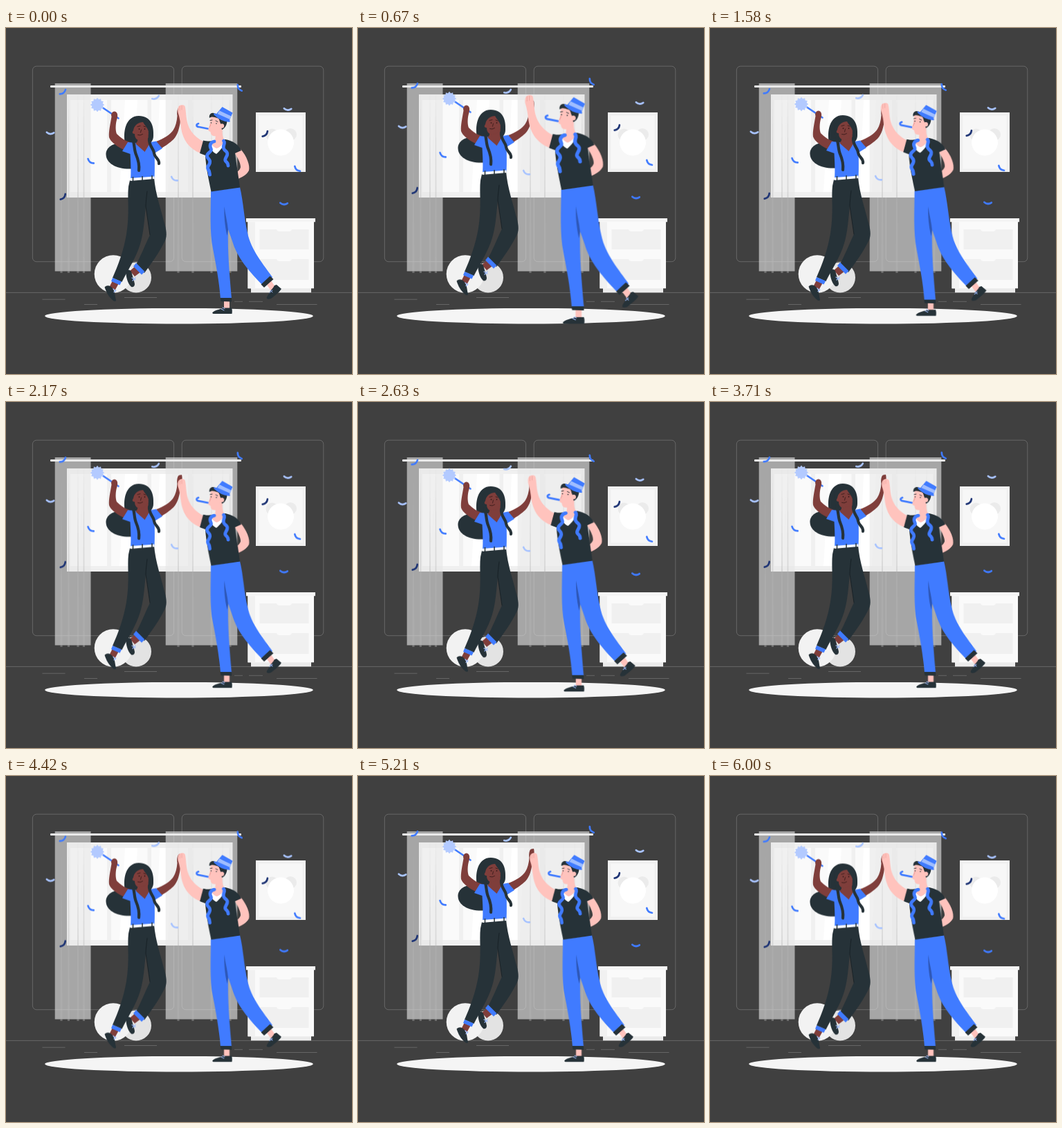
Write an HTML page that moves like this. It is 500 px wide and 500 px high and loops after 6.04 s.

```html
<!DOCTYPE html>
<html lang="en">
<head>
<meta charset="utf-8">
<title>High five</title>
<style>
  html, body { margin: 0; width: 100%; height: 100%; overflow: hidden; background: #404040; }
  svg { display: block; width: 100%; height: 100%; }
  #man { transform-origin: 322px 262.5px; }
  .dark { fill: #263238; }
  .blue { fill: #407bff; }
  .brown { fill: #7f3e3b; }
  .skin { fill: #ffc3bd; }
  .line { fill: none; stroke-linecap: round; stroke-linejoin: round; }
</style>
</head>
<body>
<svg viewBox="0 0 500 500">
  <g id="room">
    <g fill="none" stroke="#777" stroke-width=".7">
      <rect x="38.4" y="55.2" width="204.2" height="282.5" rx="5.7"/>
      <rect x="254.2" y="55.2" width="204.6" height="282.5" rx="5.7"/>
      <path d="M0 382.4H500M52.5 392.2H85.5M113 399.5H132M171 389.5H218M330 395.3H342M351 395.3H371M391 399.5H449.5"/>
    </g>

    <rect x="88" y="96" width="239.5" height="149" fill="#f0f0f0"/>
    <g id="panes" fill="#fafafa"></g>
    <path d="M93 104H112L104 237H93ZM172 104H190L182 237H164ZM222 104H240L234 237H216Z" fill="#fff"/>
    <rect x="64" y="83" width="276" height="3" rx="1" fill="#f0f0f0"/>
    <g fill="#e6e6e6" fill-opacity=".61">
      <rect x="70.7" y="80" width="51.8" height="271.5"/>
      <rect x="230.7" y="80" width="103.6" height="271.5"/>
    </g>
    <g id="folds" fill="#b5b5b5" fill-opacity=".38"></g>

    <rect x="361" y="122" width="72" height="86" fill="#f0f0f0"/>
    <rect x="365.500" y="126.500" width="63" height="77" fill="#f7f7f7"/>
    <circle cx="384.500" cy="154.500" r="9" fill="#ebebeb"/>
    <circle cx="411" cy="154" r="9" fill="#ebebeb"/>
    <circle cx="397" cy="165.500" r="19" fill="#fff"/>

    <rect x="354" y="374" width="87" height="8.300" fill="#ebebeb"/>
    <rect x="349.500" y="279" width="95.500" height="97.300" fill="#fafafa"/>
    <rect x="349.500" y="279" width="10.500" height="97.300" fill="#f1f1f1"/>
    <rect x="347" y="275" width="100" height="5.300" fill="#f5f5f5"/>
    <path d="M366.500 291H391Q392 294 395 294H409Q412 294 413 291H437.500V320H366.500ZM366.500 334H391Q392 337 395 337H409Q412 337 413 334H437.500V364H366.500Z" fill="#f0f0f0"/>

    <circle cx="188" cy="360.500" r="22" fill="#e3e3e3"/>
    <circle cx="155" cy="355.500" r="27.300" fill="#f2f2f2"/>
    <ellipse cx="250" cy="416.200" rx="193.900" ry="11.300" fill="#f5f5f5"/>
  </g>

  <g id="confetti" class="line" stroke-width="2.7"></g>

  <g id="woman">
    <path class="dark" d="M175 166C158 164 144 171 144.500 183C145 197 163 206 187 203L194 170Z"/>
    <path class="dark" d="M172 166C169 152 172 127 192 127C209 127 214 141 213 156C213 163 209 166 206 168L180 170Z"/>

    <path d="M138 114L162.500 130.500" class="line" stroke="#407bff" stroke-width="2.6"/>
    <path id="burst" fill="#b3caff"/>
    <path class="brown" d="M152.500 128C151 124 154 120.500 157 120.500C161 121 162 126 160.500 131C158 139 158 148 160 153C165 158 172 163 179 165L172 177C162 172 151 165 149 158C148 150 151 138 152.500 128Z"/>
    <path class="brown" d="M247.500 127C246.500 121 248 115 250.500 114.500L254 114C255.500 120 254 126 252.500 131C251 144 248 155 242 161C237 166 229 171 223 175L217 164C227 160 238 154 242 147C245 142 247 135 247.500 127Z"/>

    <path class="blue" d="M176 165L188 166L200 178L209 165L217 163.500L226 174L214.500 181C215 192 215 204 214.500 217L180 219C181 206 180 192 179.500 182L168 178Z"/>
    <path class="brown" d="M190 156L206 152C205 159 206 163 209 165L200.500 179L187 167C190 165 191 162 190 156Z"/>
    <path class="brown" d="M185 143C184 146 182 150 183 152C184 153 186 153 186 153C186 159 189 163 195 162C202 161 206 156 206 149L205 137L192 134Z"/>
    <path class="dark" d="M184 148C185 140 192 136 198 136C201 142 206 144 207 155L211 152C213 142 208 131 196 129C184 129 178 139 180 154Z"/>
    <g fill="#3a1c1b">
      <circle cx="192.500" cy="146" r=".9"/><circle cx="200.500" cy="146" r=".9"/>
    </g>
    <path class="line" stroke="#3a1c1b" stroke-width=".9" d="M190 142.500L194 141.500M199 142L202 143M190.500 154.500Q194 156 197.500 153.500M195.500 147L194.500 151"/>
    <path class="line" stroke="#263238" stroke-width="4.200" d="M183 160C186 168 185 176 188 183C191 190 193 197 192 206M207 160C206 170 214 175 214 181C215 188 222 189 221 196"/>

    <path class="dark" d="M179 220L214 216.500C216 240 224 262 228 279C232 291 233 301 230 307C222 324 210 340 200 354L187.500 343C194 331 200 316 208 299L202 258C200 276 199 296 194 312C188 332 176 350 167.500 367L154 361C162 343 170 322 174 298C179 268 175 246 177 229Z"/>
    <path class="line" stroke="#151e23" stroke-width=".8" d="M204 236C203 244 202 252 202 258L208 299"/>
    <path d="M180 217L214.500 214.500V218L179.500 221Z" fill="#fff"/>
    <path d="M183.500 215V222M197 214V221M211 213V220" stroke="#263238" stroke-width="1.500"/>

    <path class="brown" d="M154 365L163 369L157.500 379L149.500 374ZM186 345L194 353L186 359L179 351Z"/>
    <path d="M154 361L167 366.500L164.500 371.500L152 366ZM188 339.500L200.500 352L196 356.500L184 344.500Z" class="blue"/>
    <path class="dark" d="M142.500 374.500C146 371 150 372 153 375C158 380 157 386 159 393C159.500 395 157 395.500 155 394C148 388 145 382 142.500 374.500ZM173 352C176 348 180 349 181.500 353C183 360 185 364 186 370C186 374 183 375 181 374C175 368 174 360 173 352Z"/>
    <path class="line" stroke="#9fbdff" stroke-width="1.200" d="M155 377L158.500 380M156 381.500L159 379M182 361L187 364M183 365L187 361"/>
  </g>

  <g id="man">
    <path class="skin" d="M248.500 122C248 117 248.500 113.500 250.500 112.500C252 111 257.500 110.500 258.500 113C259.500 116 260 122 260.500 128C262 144 270 157 287 165L281 181C264 174 256 162 253 145C252 137 251 129 248.500 122Z"/>
    <path class="line" stroke="#e99c95" stroke-width=".6" d="M251 113V119M254 112.500V118"/>
    <path class="skin" d="M329 175L339 175C348 185 353 199 351 206C347 214 337 217 330 221C326 224 320 223 318.500 221C319 218 325 215 329 211C334 208 338 206 339 201C339 194 334 187 331 181Z"/>
    <path class="line" stroke="#e99c95" stroke-width=".6" d="M320 221L326 217M322.500 222L328 219"/>

    <path class="blue" d="M296 236L338 230C343 251 344 275 349 296C354 321 373 343 385 360L372 373C351 352 333 330 327 308L321 291C320 323 323 356 326 391L310 391.500C308 365 303 340 299 319C294 294 296 265 296 236Z"/>
    <path d="M315.500 258C317 270 320 280 321 292L319.500 300C316 285 315 271 315.500 258Z" fill="#2e58b8"/>
    <path class="dark" d="M285 162.500C292 164 296 164 301 162L317 161C327 163 335 167 340 177L331 181C333 197 336 214 338 230.500L296.500 236.500C293 219 289 202 288 184L280 181Z"/>
    <path d="M293 169L302 161L317 163C315 170 309 178 304 182C299 180 296 175 293 169Z" fill="#fff"/>
    <path class="skin" d="M302 148L313 142C312 152 313 159 316 162C313 169 309 173 304 174C300 172 298 170 297 167C302 165 304 160 302 148Z"/>
    <path class="skin" d="M296 126L313 129C314 142 312 153 306 156C300 157 296 156 295.500 150C292 149 291 147 294 142Z"/>
    <path class="dark" d="M294 130C293 126 296 122 300 123L319 128C321 138 317 145 312 147L310 138C308 134 309 131 305 130C301 129 298 127 294 130Z"/>
    <circle class="skin" cx="312" cy="141.500" r="3.200"/>
    <g fill="#263238">
      <circle cx="296.500" cy="137" r=".8"/><circle cx="304" cy="138" r=".8"/>
    </g>
    <path class="line" stroke="#263238" stroke-width=".9" d="M295 133.500L298 133M303 134L306 135.500"/>
    <path d="M296 139L294 143.500" class="line" stroke="#e58d88" stroke-width=".8"/>

    <path class="blue" d="M312.500 114L327.500 122.500L322 135.500L302 126.500Z"/>
    <path d="M308.500 119.500L325.500 127.500L323.500 132L305.500 124Z" fill="#9fbdff"/>
    <path class="line" stroke="#407bff" stroke-width="2.600" d="M301.500 124.500C307 130 315 134 322.500 134.500"/>
    <path class="line" stroke="#407bff" stroke-width="2.700" d="M291.500 145.500L279 143C275 143 274 139 278 138.200"/>

    <path class="line" stroke="#407bff" stroke-width="4.800" d="M301 164C295 165 294 170 296 174C299 179 290 180 290.500 185C291 190 296 189 294.500 195C293 200 290 200 292 204C295 208 294 210 294.500 212M314.500 163C318 167 312 170 315 175C317 179 321 178 319.500 184C317 189 315 191 319 194C321 196 321 198 321 199"/>

    <path class="skin" d="M315 394L323 394V406H315ZM376 370L383 365L389 374L384 381Z"/>
    <path class="dark" d="M309.500 390L326 390V395.500L310.500 395ZM381.500 358.500L386.500 363L373 375L368.500 370.500Z"/>
    <path class="dark" d="M299 410.500C304 407 310 406.500 315 404.500H326C327 407 327 410 326.500 413H299.500C298 412.500 298 411 299 410.500ZM377 391C376 389 379 386 381 382C383 378 386 376 388 372L391 371L398 377C394 383 388 387 383 391C380 392 378 392 377 391Z"/>
    <path class="line" stroke="#9fbdff" stroke-width="1" d="M311 406L315 408M313 404L316 405.500M382 379L385 382M381 382.500L385 379"/>
  </g>
</svg>
<script>
  const LOOP = 6040;
  const NS = 'http://www.w3.org/2000/svg';
  const $ = id => document.getElementById(id);

  function add(parent, tag, attrs) {
    const el = document.createElementNS(NS, tag);
    for (const key in attrs) el.setAttribute(key, attrs[key]);
    parent.appendChild(el);
  }

  for (const [x, width] of [[93, 53], [152, 52.5], [210, 53], [269, 53]])
    add($('panes'), 'rect', { x, y: 104, width, height: 133 });

  // Tapered pleats hanging below the hem
  for (const x of [80, 90.5, 104, 112.5, 249, 270, 297, 313, 324])
    add($('folds'), 'path', { d: `M${x} 92L${x + 1.6} 354H${x - 1.6}Z` });

  const pale = '#a9c4ff', blue = '#407bff', navy = '#1f3575';
  const bits = [
    [82.5, 93, -38, blue], [64, 152, 4, pale], [122, 193, 38, blue],
    [83, 244.500, -48, navy], [216.500, 101, -24, pale], [243, 218.500, 32, pale],
    [337, 87, 55, blue], [407, 117.500, 4, pale], [375, 153.500, -46, navy],
    [420.500, 204, 42, blue], [401.500, 254, 3, blue]
  ];
  for (const [x, y, turn, stroke] of bits)
    add($('confetti'), 'path', {
      d: 'M-5.200 -1Q0 3 5.200 -1', stroke,
      transform: `translate(${x} ${y}) rotate(${turn})`
    });

  const points = Array.from({ length: 24 }, (_, i) => {
    const r = i % 2 ? 7.9 : 10.2, a = i * Math.PI / 12;
    return `${132 + r * Math.cos(a)} ${111 + r * Math.sin(a)}`;
  });
  $('burst').setAttribute('d', `M${points.join('L')}Z`);

  function play(id, steps, duration) {
    const frames = steps.map(([offset, transform]) => ({ offset, transform }));
    const anim = $(id).animate(frames, { duration, iterations: Infinity });
    anim.startTime = 0;
    return anim;
  }

  const float = [[0, 'translateY(0px)'], [.5, 'translateY(-10px)'], [1, 'translateY(0px)']];
  const beat = [[0, 1], [.1, 1.1], [.3, 1], [.4, 1], [.5, 1.1], [.6, 1], [1, 1]]
    .map(([at, size]) => [at, `scale(${size})`]);

  const start = document.timeline.currentTime || 0;
  for (const anim of [
    play('woman', float, LOOP / 4),
    play('confetti', float, LOOP / 4),
    play('man', beat, LOOP)
  ]) anim.startTime = start;
</script>
</body>
</html>
```
